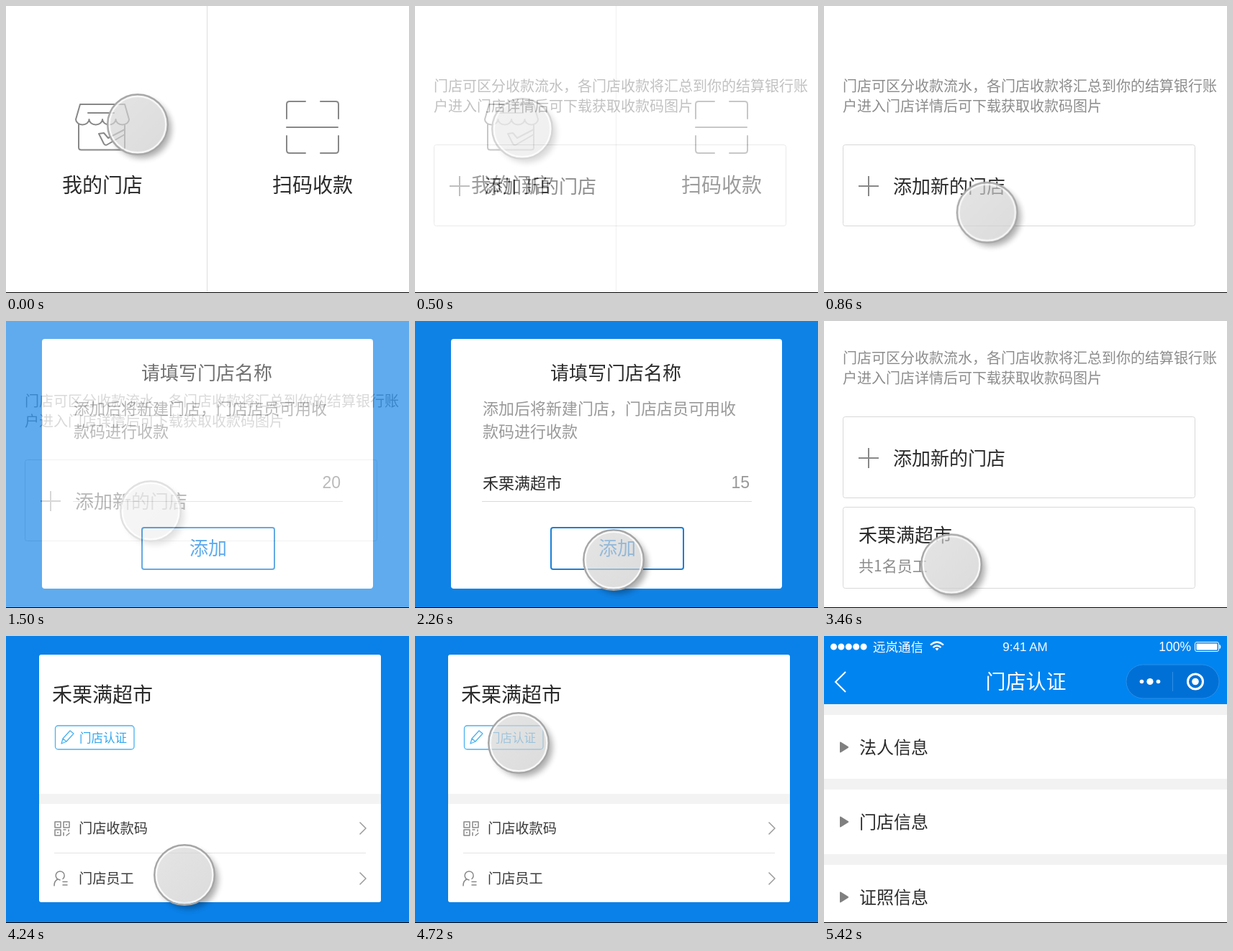
These frames come from a looping animation (560 px wide and 400 px high, 6.48 s). An HTML page:

```html
<!DOCTYPE html>
<html lang="zh-CN">
<head>
<meta charset="utf-8">
<title>门店认证</title>
<style>
  html, body { margin: 0; width: 100%; height: 100%; overflow: hidden; background: #fff; }
  svg { display: block; width: 560px; height: 400px; }
  text { font-family: "Noto Sans CJK SC", "Noto Sans CJK", sans-serif; fill: #2b2b2b; }
  .latin { font-family: "Liberation Sans", sans-serif; }
  .line { fill: none; stroke: #888; stroke-width: 2; stroke-linecap: round; stroke-linejoin: round; }
  .thin { stroke-width: 1.5; }
  .card { fill: #fff; stroke: #d8d8d8; }
  .note { fill: #8c8c8c; font-size: 20px; }
  .t28 { font-size: 28px; }
  .t26 { font-size: 26px; }
  .t24 { font-size: 24px; }
  .t22 { font-size: 22px; }
  .row { font-size: 19.2px; font-weight: 500; fill: #3a3a3a; }
  .bar text { fill: #fff; }

  /* One loop is 6480 ms; every percentage is time / 64.8. */
  .scene, .dot, .cover, .reel { animation: 6480ms linear infinite both; }
  .list    { animation-name: show-list; }
  .dialog  { animation-name: show-dialog; }
  .added   { animation-name: show-added; }
  .detail  { animation-name: show-detail; }
  .certify { animation-name: show-certify; }
  @keyframes show-list    { 0%, 5.247%  { opacity: 0 } 9.877%, 100%  { opacity: 1 } }
  @keyframes show-dialog  { 0%, 20.062% { opacity: 0 } 24.691%, 100% { opacity: 1 } }
  @keyframes show-added   { 0%, 43.827% { opacity: 0 } 48.3%, 100%   { opacity: 1 } }
  @keyframes show-detail  { 0%, 61.111% { opacity: 0 } 65.432%, 100% { opacity: 1 } }
  @keyframes show-certify { 0%, 77.778% { opacity: 0 } 82.716%, 100% { opacity: 1 } }

  .dot { --out: cubic-bezier(.3333, .6667, .6667, 1); }
  .home .dot   { animation-name: to-store; }
  .list .dot   { animation-name: to-add; }
  .dialog .dot { animation-name: to-confirm; }
  .added .dot  { animation-name: to-card; }
  .detail .dot { animation-name: to-badge; }
  @keyframes to-store {
    0% { transform: translate(183px, 165px); animation-timing-function: var(--out) }
    2.16%, 100% { transform: translate(149px, 171px) }
  }
  @keyframes to-add {
    0%, 9.877% { transform: translate(402px, 443px); animation-timing-function: var(--out) }
    15.741%, 100% { transform: translate(201px, 265px) }
  }
  @keyframes to-confirm {
    0%, 33.025% { transform: translate(276px, 443px); animation-timing-function: var(--out) }
    34.877%, 100% { transform: translate(276px, 333px) }
  }
  @keyframes to-card {
    0%, 48.241% { transform: translate(332px, 443px); animation-timing-function: var(--out) }
    58.025%, 100% { transform: translate(145px, 318px) }
  }
  @keyframes to-badge {
    0%, 66.975% { transform: translate(248px, 333px); animation-timing-function: ease-in }
    68.981% { transform: translate(208px, 215px); animation-timing-function: ease-out }
    70.988% { transform: translate(143px, 118px); animation-timing-function: ease-in-out }
    72.84% { transform: translate(144px, 149px) }
    74.383%, 100% { transform: translate(144px, 148px) }
  }

  .cover { animation-name: type; }
  .reel  { animation-name: count; }
  @keyframes type {
    0%, 25% { transform: translateX(0); animation-timing-function: steps(5) }
    29.63%, 100% { transform: translateX(110px) }
  }
  @keyframes count {
    0%, 25% { transform: translateY(0); animation-timing-function: steps(5) }
    29.63%, 100% { transform: translateY(-150px) }
  }
</style>
</head>
<body>
<svg viewBox="0 0 560 400">
  <defs>
    <linearGradient id="glass" x1="0" y1="0" x2="1" y2="1">
      <stop offset="0" stop-color="#d8d8d8"/>
      <stop offset="1" stop-color="#cbcbcb"/>
    </linearGradient>
    <filter id="soft" x="-30%" y="-30%" width="160%" height="160%"><feGaussianBlur stdDeviation="4"/></filter>
    <clipPath id="outside"><path clip-rule="evenodd" d="M-70-70H70V70H-70ZM-42 0a42 42 0 1 0 84 0a42 42 0 1 0-84 0Z"/></clipPath>
    <clipPath id="window"><rect x="430" y="210" width="40" height="30"/></clipPath>

    <g id="touch">
      <g clip-path="url(#outside)"><circle cx="6" cy="6" r="41" opacity=".32" filter="url(#soft)"/></g>
      <circle r="41" fill="url(#glass)" fill-opacity=".68"/>
      <circle r="39.4" fill="none" stroke="#fff" stroke-opacity=".75" stroke-width="2.6"/>
      <circle r="41.8" fill="none" stroke="#a6a6a6" stroke-width="2.4"/>
    </g>

    <g id="intro">
      <text class="note" x="26" y="119">门店可区分收款流水，各门店收款将汇总到你的结算银行账</text>
      <text class="note" x="26" y="147">户进入门店详情后可下载获取收款码图片</text>
      <rect class="card" x="26.5" y="193.5" width="489" height="113" rx="3"/>
      <path d="M48 251H76M62 237V265" fill="none" stroke="#888" stroke-width="2"/>
      <text class="t26" x="96" y="261">添加新的门店</text>
    </g>
    <path id="chevron" class="line thin" d="M-4-8L4 0L-4 8" style="stroke:#999"/>
    <path id="arrow" d="M-5.500-6.500Q-5.500-8-4-7.200L6-1Q7.500 0 6 1L-4 7.200Q-5.500 8-5.500 6.500Z" fill="#808080"/>
  </defs>

  <g class="scene home">
    <rect width="560" height="400" fill="#fff"/>
    <rect x="279" width="1" height="400" fill="#dedede"/>
    <g class="line">
      <path d="M103 137H165L171 158a9.250 7.500 0 0 1-18.500 0a9.250 7.500 0 0 1-18.500 0a9.250 7.500 0 0 1-18.500 0a9.250 7.500 0 0 1-18.500 0Z"/>
      <path d="M114 149H150M101 165V197Q101 200.500 104.500 200.500H161.500Q165 200.500 165 197V165"/>
      <path d="M165 172L142 184L136 177L129 178L136 192Q138 195 141 193L165 179"/>
      <path d="M390 157V137Q390 133 394 133H416M437 133H458Q462 133 462 137V157M390 181V201Q390 205 394 205H416M437 205H458Q462 205 462 201V181M390 169H461"/>
    </g>
    <text class="t28" x="78" y="260">我的门店</text>
    <text class="t28" x="370" y="260">扫码收款</text>
    <g class="dot"><use href="#touch"/></g>
  </g>

  <g class="scene list">
    <rect width="560" height="400" fill="#fff"/>
    <use href="#intro"/>
    <g class="dot"><use href="#touch"/></g>
  </g>

  <g class="scene dialog">
    <rect width="560" height="400" fill="#0f82e6"/>
    <rect x="50" y="25" width="460" height="348" rx="4" fill="#fff"/>
    <text class="t26" x="188" y="82">请填写门店名称</text>
    <g class="t22">
      <text x="94" y="129.500" style="fill:#999">添加后将新建门店，门店店员可用收</text>
      <text x="94" y="162" style="fill:#999">款码进行收款</text>
      <text x="94" y="233.500">禾栗满超市</text>
    </g>
    <rect class="cover" x="93" y="212" width="112" height="28" fill="#fff"/>
    <g clip-path="url(#window)">
      <text class="reel latin" font-size="23" text-anchor="end" style="fill:#999">
        <tspan x="465" y="233">20</tspan><tspan x="465" dy="30">19</tspan><tspan x="465" dy="30">18</tspan><tspan x="465" dy="30">17</tspan><tspan x="465" dy="30">16</tspan><tspan x="465" dy="30">15</tspan>
      </text>
    </g>
    <rect x="93" y="251" width="375" height="1" fill="#d9d9d9"/>
    <rect x="189" y="288" width="184" height="58" rx="3" fill="#fff" stroke="#1a7fd6" stroke-width="2"/>
    <text class="t26" x="255" y="326" style="fill:#0f82e6">添加</text>
    <g class="dot"><use href="#touch"/></g>
  </g>

  <g class="scene added">
    <rect width="560" height="400" fill="#fff"/>
    <use href="#intro" y="-60"/>
    <rect class="card" x="26.500" y="259.500" width="489" height="113" rx="3"/>
    <text class="t26" x="48" y="308">禾栗满超市</text>
    <text x="48" y="349" font-size="21" style="fill:#8c8c8c">共1名员工</text>
    <g class="dot"><use href="#touch"/></g>
  </g>

  <g class="scene detail">
    <rect width="560" height="400" fill="#0a81e8"/>
    <rect x="46" y="26" width="475" height="345" rx="3" fill="#fff"/>
    <text class="t28" x="64" y="92">禾栗满超市</text>
    <rect x="68.500" y="125" width="109.500" height="33" rx="4" fill="none" stroke="#49b2f0" stroke-width="1.300"/>
    <path class="line" d="M77 150L79 143L89 132L94 136L84 147ZM79 143L84 147" style="stroke:#49b2f0;stroke-width:1.300"/>
    <text x="102" y="148" font-size="16.500" font-weight="500" style="fill:#2fa6f0">门店认证</text>
    <rect x="46" y="220" width="475" height="14" fill="#f3f3f3"/>
    <path class="line thin" d="M68 259H76V267H68ZM80 259H88V267H80ZM68 270H76V278H68ZM71.500 263H72.500M83.500 263H84.500M71.500 274H72.500M80 270H83M87 270V272M80 274V278M84 278L88 275"/>
    <text class="row" x="101" y="275">门店收款码</text>
    <use href="#chevron" x="496" y="268"/>
    <rect x="67" y="302" width="433" height="1" fill="#e4e4e4"/>
    <path class="line thin" d="M72 339A6 6 0 1 1 79 338.500M72 339Q67 341 67 348M72 339L75 340M79 342.500H85M79 347H85"/>
    <text class="row" x="101" y="345">门店员工</text>
    <use href="#chevron" x="496" y="338"/>
    <g class="dot"><use href="#touch"/></g>
  </g>

  <g class="scene certify">
    <rect width="560" height="400" fill="#f2f2f2"/>
    <rect width="560" height="95" fill="#0084f0"/>
    <g class="bar">
      <path d="M13.500 15H55.500" stroke="#fff" stroke-width="9" stroke-linecap="round" stroke-dasharray="0 10.400"/>
      <text x="68" y="21.500" font-size="17.500">远岚通信</text>
      <g fill="none" stroke="#fff" stroke-width="2.300">
        <path d="M148 12.500Q157 4.500 166 12.500M151.500 16Q157 11 162.500 16"/>
        <path d="M154.500 17.500Q157 15.500 159.500 17.500L157 20.500Z" fill="#fff" stroke="none"/>
      </g>
      <text class="latin" x="279.500" y="21" font-size="17" text-anchor="middle">9:41 AM</text>
      <text class="latin" x="510" y="21" font-size="17.500" text-anchor="end">100%</text>
      <rect x="515.500" y="8.500" width="33" height="13" rx="2.500" fill="none" stroke="#fff"/>
      <rect x="517.500" y="10.500" width="29" height="9" rx="1" fill="#fff"/>
      <path d="M550 12.500q2 2.500 0 5z" fill="#fff" stroke="#fff"/>
      <path d="M30 50L16 64L30 78" fill="none" stroke="#fff" stroke-width="2"/>
      <text class="t28" x="224.500" y="74" font-weight="300">门店认证</text>
      <rect x="420" y="40" width="129" height="47" rx="23.500" fill="#0070d6" stroke="#2a8fe8"/>
      <rect x="484" y="50" width="1" height="27" fill="#2f8fe4"/>
      <g fill="#fff">
        <circle cx="441.500" cy="63.500" r="2.800"/>
        <circle cx="453" cy="63.500" r="4.600"/>
        <circle cx="464.500" cy="63.500" r="2.800"/>
        <circle cx="516" cy="63.500" r="4.800"/>
      </g>
      <circle cx="516" cy="63.500" r="10.500" fill="none" stroke="#fff" stroke-width="3"/>
    </g>
    <path d="M0 110H560V199H0ZM0 214H560V304H0ZM0 319H560V400H0Z" fill="#fff"/>
    <use href="#arrow" x="27.500" y="155"/>
    <use href="#arrow" x="27.500" y="259"/>
    <use href="#arrow" x="27.500" y="364"/>
    <g class="t24">
      <text x="49" y="164">法人信息</text>
      <text x="49" y="268">门店信息</text>
      <text x="49" y="373">证照信息</text>
    </g>
  </g>

  <rect y="399" width="560" height="1"/>
</svg>
</body>
</html>
```
